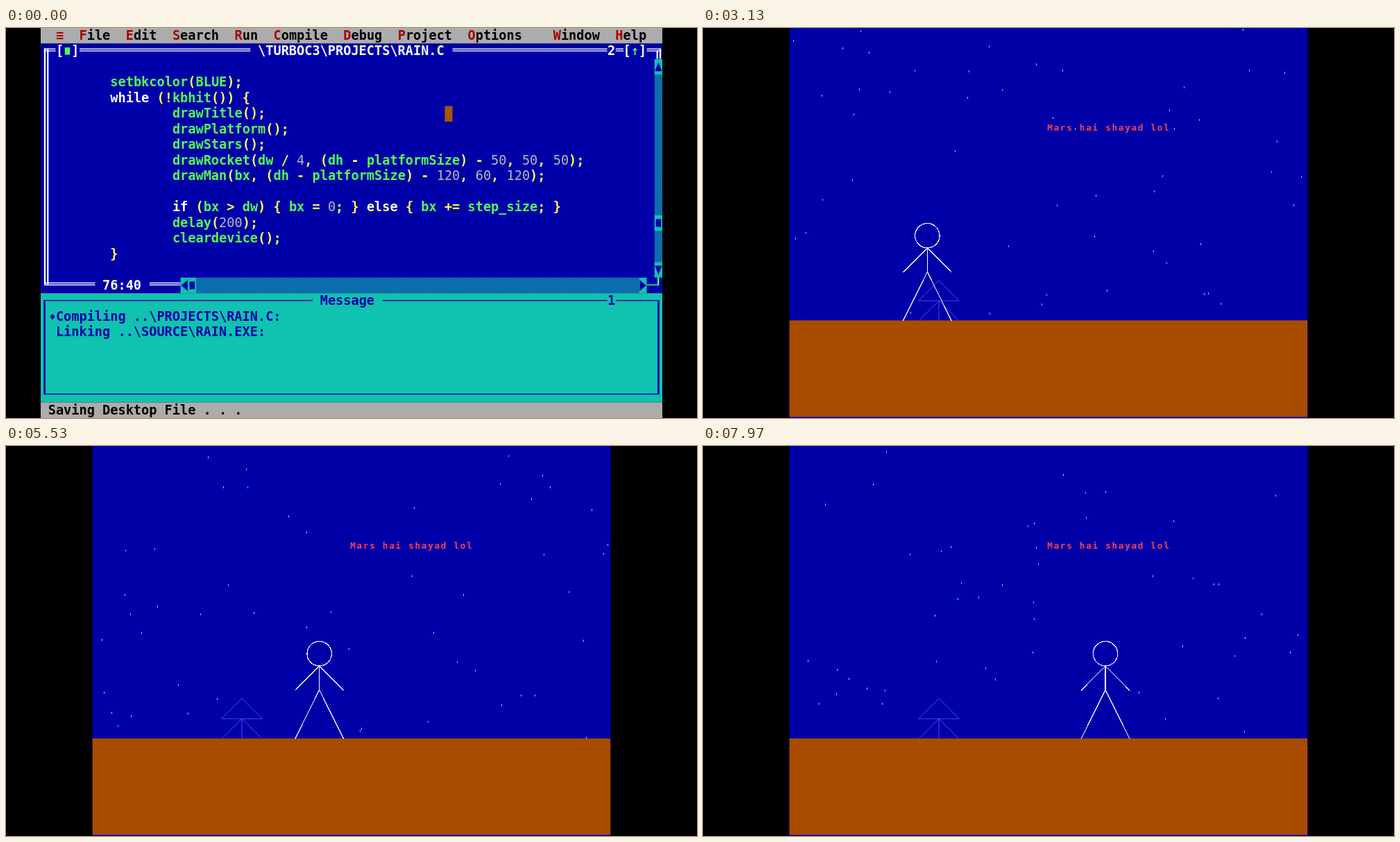
Recreate the animation shown at these times as an HTML page. Size 996 px wide and 562 px high, loop 8000 ms.

```html
<!DOCTYPE html>
<html lang="en">
<head>
<meta charset="utf-8">
<title>Rain</title>
<style>
  html, body { margin: 0; width: 100%; height: 100%; overflow: hidden; background: #000; }
  svg { display: block; width: 996px; height: 562px; }
  text { font: bold 18.6px "DejaVu Sans Mono", "Liberation Mono", monospace; white-space: pre; }
  #title { font-size: 12.6px; letter-spacing: 1.75px; }
  .line { fill: none; stroke-linejoin: round; }
  .thin { font-weight: normal; }
</style>
</head>
<body>
<svg viewBox="0 0 996 562">
  <defs>
    <pattern id="track" width="2.8" height="2.8" patternUnits="userSpaceOnUse">
      <rect width="2.8" height="2.8" fill="#0828ac"/>
      <rect width="1.4" height="1.4" fill="#10b4b0"/>
      <rect x="1.4" y="1.4" width="1.4" height="1.4" fill="#10b4b0"/>
    </pattern>
  </defs>
  <rect width="996" height="562"/>
  <g id="ide"></g>
  <g id="scene">
    <rect x="124.6" width="747" height="562" fill="#0000a8"/>
    <g id="ground">
      <rect x="124.6" y="421.4" width="746.6" height="139" fill="#a84c00"/>
      <rect x="124.6" y="560" width="746.6" height="1" fill="#5c1878"/>
    </g>
    <text id="title" x="496.2" y="147.8" fill="#fc4250">Mars hai shayad lol</text>
    <g id="stars" shape-rendering="crispEdges"></g>
    <path class="line" stroke="#5240f4" stroke-width="1"
      d="M340 363.7L310.6 393H369.4ZM340 393V421.5M340 393L311.3 421.5M340 393L368.7 421.5"/>
    <g id="man" class="line" stroke="#fff" stroke-width="1.2" shape-rendering="crispEdges">
      <circle cy="299.2" r="17.7"/>
      <path d="M0 317V351.6M-35 352.2L0 317L35 352.2M-35 422L0 351.4L35 422"/>
    </g>
  </g>
</svg>
<script>
const $ = id => document.getElementById(id);
const BLUE = '#0000a8', TEAL = '#10c2b0', GRAY = '#acacac', RED = '#a80000',
      WHITE = '#fcfcfc', GREEN = '#54fc54', YELLOW = '#fcfc54';
const CW = 11.2, CH = 22.48, DOT = 1.405;
const X = col => 50 + col * CW;
const Y = row => row * CH;

function add(parent, tag, attrs, content) {
  const e = document.createElementNS('http://www.w3.org/2000/svg', tag);
  for (const k in attrs) e.setAttribute(k, attrs[k]);
  if (content) e.textContent = content;
  parent.appendChild(e);
  return e;
}
const ide = $('ide');
const box = (x, y, width, height, fill) => add(ide, 'rect', { x, y, width, height, fill });
const cells = (col, row, w, h, fill) => box(X(col), Y(row), w * CW, h * CH, fill);
const put = (col, row, s, fill, cls = '') =>
  add(ide, 'text', { x: X(col) - 0.5, y: Y(row) + 17, fill, class: cls }, s);
const shape = (d, fill) => add(ide, 'path', { d, fill });

function drawMenu() {
  cells(0, 0, 80, 1, GRAY);
  put(2, 0, '≡', RED);
  const menu = { File: 5, Edit: 11, Search: 17, Run: 25, Compile: 30, Debug: 39,
                 Project: 46, Options: 55, Window: 66, Help: 74 };
  for (const name in menu) {
    put(menu[name], 0, name[0], RED);
    put(menu[name] + 1, 0, name.slice(1), '#000');
  }
}

function doubleLine(from, to, row) {
  for (const d of [5, 7]) box(from, Y(row) + d * DOT, to - from, DOT, WHITE);
}

function arrow(col, row, dx, dy) {
  cells(col, row, 1, 1, TEAL);
  const x = X(col) + CW / 2, y = Y(row) + CH / 2;
  shape(dx
    ? `M${x + 4.6 * dx} ${y}L${x - 4.6 * dx} ${y - 8}V${y + 8}Z`
    : `M${x} ${y + 7 * dy}L${x - 5} ${y - 6 * dy}H${x + 5}Z`, BLUE);
}

function thumb(col, row) {
  cells(col, row, 1, 1, TEAL);
  box(X(col) + 1.8, Y(row) + 5.6, 7.6, 11.2, BLUE);
}

function code(col, row, line) {
  for (const m of line.matchAll(/\w+|[^\w\s]+/g)) {
    const w = m[0], number = /^\d/.test(w);
    const color = /^(while|if|else)$/.test(w) ? WHITE
      : number ? '#b8b8b8' : /\w/.test(w) ? GREEN : YELLOW;
    put(col + m.index, row, w, color, number ? 'thin' : '');
  }
}

function drawEditor() {
  cells(0, 1, 80, 16, BLUE);
  doubleLine(X(0) + 5, X(2) - 1, 1);
  doubleLine(X(5), X(27), 1);
  doubleLine(X(53), X(73) - 1, 1);
  doubleLine(X(74), X(75), 1);
  doubleLine(X(78), X(79) + 8, 1);
  for (const d of [2, 5]) {
    box(X(0) + 2 + d * 1.4, Y(1) + 7, 2.4, Y(15) + 3, WHITE);
    box(X(79) + d * 1.4, Y(1) + (d < 4 ? 10 : 7), 2.4, d < 4 ? 12 : 15, WHITE);
  }
  put(2, 1, '[', WHITE);
  box(X(3) + 1.2, Y(1) + 5.6, 7.4, 10.5, GREEN);
  put(4, 1, ']', WHITE);
  put(28, 1, '\\TURBOC3\\PROJECTS\\RAIN.C', WHITE);
  put(73, 1, '2', WHITE);
  put(75, 1, '[', WHITE);
  put(76, 1, '↑', GREEN);
  put(77, 1, ']', WHITE);

  code(9, 3, 'setbkcolor(BLUE);');
  code(9, 4, 'while (!kbhit()) {');
  ['drawTitle();', 'drawPlatform();', 'drawStars();',
   'drawRocket(dw / 4, (dh - platformSize) - 50, 50, 50);',
   'drawMan(bx, (dh - platformSize) - 120, 60, 120);', '',
   'if (bx > dw) { bx = 0; } else { bx += step_size; }',
   'delay(200);', 'cleardevice();'].forEach((s, i) => code(17, 5 + i, s));
  code(9, 14, '}');
  cells(52, 5, 1, 1, '#a85400');

  cells(79, 3, 1, 12, 'url(#track)');
  arrow(79, 2, 0, -1);
  arrow(79, 15, 0, 1);
  thumb(79, 12);

  doubleLine(X(0) + 5, X(7), 16);
  doubleLine(X(14), X(18), 16);
  put(8, 16, '76:40', WHITE);
  cells(20, 16, 57, 1, 'url(#track)');
  arrow(18, 16, -1, 0);
  arrow(77, 16, 1, 0);
  thumb(19, 16);
  box(X(78), Y(16) + 7 * DOT, 16, DOT, GREEN);
  box(X(79) + 4.2, Y(16), 2.4, 8 * DOT, GREEN);
}

function drawMessages() {
  cells(0, 17, 80, 7, TEAL);
  const left = X(0) + 4.2, right = X(79) + 7, top = Y(17) + 9.8, bottom = Y(23) + 9.8;
  for (const [a, b] of [[left, X(35)], [X(44), X(73) - 1], [X(74), right]])
    box(a, top, b - a, DOT, BLUE);
  box(left, bottom, right - left, DOT, BLUE);
  for (const x of [left, right - 2.8]) box(x, top, 2.8, bottom - top, BLUE);
  put(36, 17, 'Message', BLUE);
  put(73, 17, '1', BLUE);
  shape(`M67 ${Y(18) + 7}l3.6 4.4l-3.6 4.4l-3.6 -4.4Z`, BLUE);
  put(2, 18, 'Compiling ..\\PROJECTS\\RAIN.C:', BLUE);
  put(2, 19, 'Linking ..\\SOURCE\\RAIN.EXE:', BLUE);
  cells(0, 24, 80, 1, GRAY);
  put(1, 24, 'Saving Desktop File . . .', '#000');
}

drawMenu();
drawEditor();
drawMessages();

// The program's 640x480 screen, redrawn once per step
const LOOP = 8000, TICK = 100 / 3, START = 42.7, STEP = 214.4, WIPE = 8.4;
const SX = 746.7 / 640, SY = 562 / 480;
const tints = ['#9cc4e8', '#4cd0b8', '#7cd4dc'];

let seed = 1;
const rand = n => {
  seed = (Math.imul(seed, 0x015A4E35) + 1) >>> 0;
  return ((seed >>> 16) & 0x7fff) % n;
};
const skies = Array.from({ length: 38 }, () =>
  Array.from({ length: 50 }, () => [rand(640), rand(360)]));
const stars = skies[0].map((_, i) =>
  add($('stars'), 'rect', { width: 1, height: 3, fill: tints[i % 3] }));

function draw(ms) {
  const t = Math.floor((ms % LOOP + 4) / TICK) % 240 * TICK;
  const k = Math.max(0, Math.floor((t - START) / STEP));
  const left = START + (k + 1) * STEP - t;
  $('ide').style.display = t < 30 ? '' : 'none';
  $('scene').style.display = t < 120 ? 'none' : '';
  $('ground').style.display = left < WIPE ? 'none' : '';
  $('man').setAttribute('transform', `translate(${125 + (30 + 10 * k) * SX})`);
  stars.forEach((s, i) => {
    const [x, y] = skies[k][i];
    s.setAttribute('x', Math.round(125 + x * SX));
    s.setAttribute('y', Math.round(y * SY) - 1);
  });
}

let begin;
function loop(now) {
  begin ??= now;
  draw(now - begin);
  requestAnimationFrame(loop);
}
draw(0);
requestAnimationFrame(loop);
</script>
</body>
</html>
```
